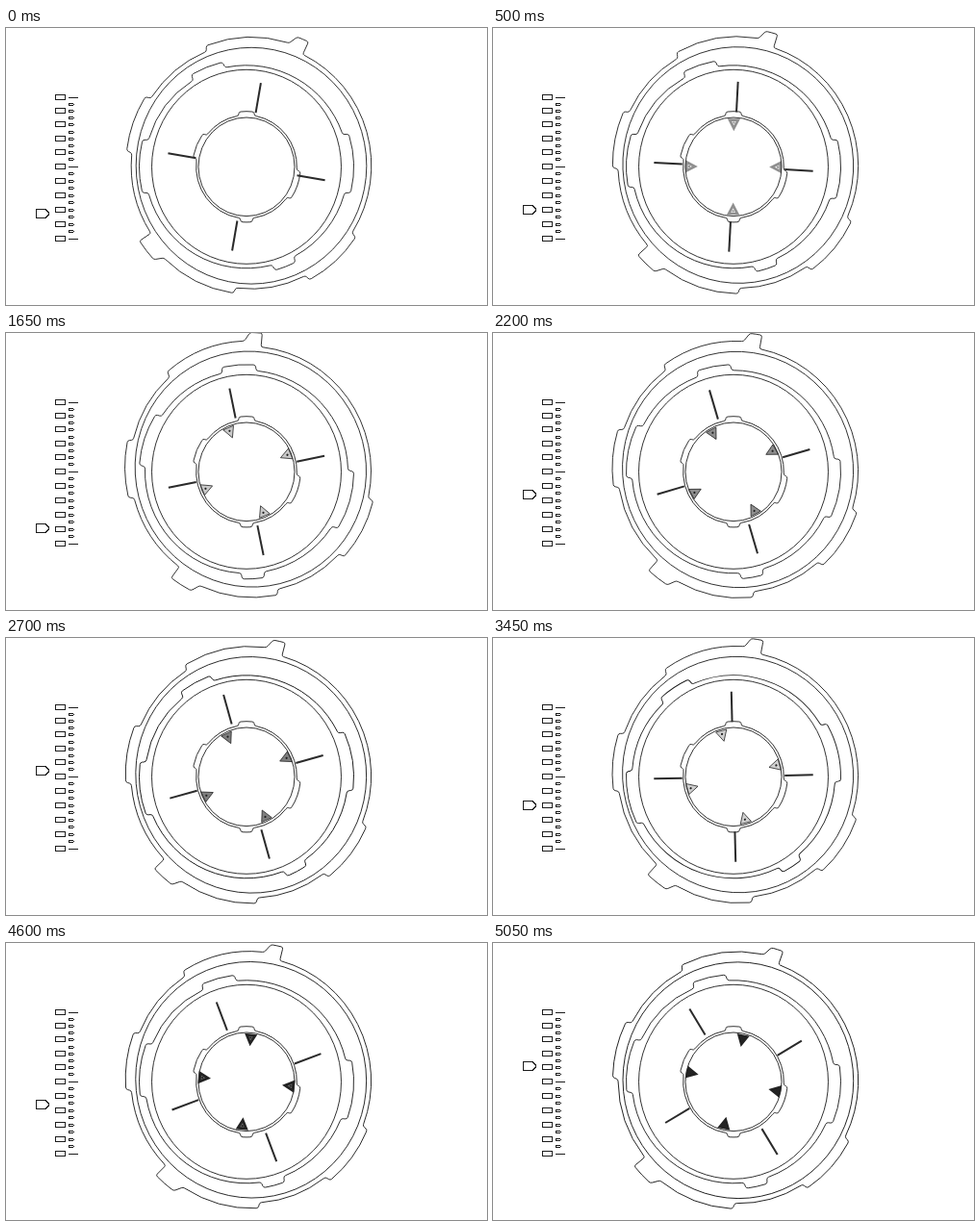
Animation of 500x288 px, one loop 5.1 s. Source, as an HTML page:

```html
<!DOCTYPE html>
<html lang="en">
<head>
<meta charset="utf-8">
<title>Dial</title>
<style>
html, body { margin: 0; width: 100%; height: 100%; overflow: hidden; background: #fff; }
svg { display: block; width: 500px; height: 288px; }
svg * { vector-effect: non-scaling-stroke; }
.line { fill: none; stroke: #1c1c1c; stroke-width: 0.9; stroke-linejoin: round; }
.crisp { stroke-width: 1; shape-rendering: crispEdges; }
.needle { stroke: #2a2a2a; stroke-width: 2; }
</style>
</head>
<body>
<svg id="stage" viewBox="0 0 500 288"></svg>
<script>
const LOOP = 5100, STEP = 50, SQUEEZE = 0.975;
const stage = document.getElementById('stage');

function add(parent, tag, attrs = {}) {
  const el = document.createElementNS('http://www.w3.org/2000/svg', tag);
  for (const key in attrs) el.setAttribute(key, attrs[key]);
  parent.appendChild(el);
  return el;
}

const group = (parent, transform) => add(parent, 'g', { transform });
const circle = (parent, r) => add(parent, 'circle', { class: 'line', r });

// Angles run clockwise from twelve o'clock.
function polar([angle, r]) {
  const a = angle * Math.PI / 180;
  return (r * Math.sin(a)).toFixed(2) + ' ' + (-r * Math.cos(a)).toFixed(2);
}

// A point a short way from one node towards another, for rounded corners.
function towards([a, r], [b, s]) {
  const da = (b - a + 900) % 360 - 180;
  const f = Math.min(0.4, 2 / Math.hypot(s - r, r * da * Math.PI / 180));
  return [a + da * f, r + (s - r) * f];
}

// Nodes of equal radius are joined by an arc, others by a line.
function ringPath(nodes) {
  const n = nodes.length;
  return nodes.map((node, i) => {
    const prev = nodes[(i + n - 1) % n], r = node[1];
    const join = i === 0 ? 'M' : prev[1] === r ? `A${r} ${r} 0 0 1 ` : 'L';
    const next = nodes[(i + 1) % n];
    return join + polar(towards(node, prev)) +
      'Q' + polar(node) + ' ' + polar(towards(node, next));
  }).join('') + `A${nodes[0][1]} ${nodes[0][1]} 0 0 1 ` +
    polar(towards(nodes[0], nodes[n - 1])) + 'Z';
}

// A ring with raised spans [from, to, horn]; a horn stands out at the end.
function raisedRing(parent, base, high, spans, slope = 0.9) {
  const top = high + 8.8;
  const nodes = spans.flatMap(([from, to, horn]) => [
    [from - slope, base], [from, high], [to, high],
    ...(horn ? [[to + 2.6, top], [to + horn, top], [to + horn, base]] : [[to + slope, base]])
  ]);
  add(parent, 'path', { class: 'line', d: ringPath(nodes) });
}

// Scale on the left: 20 ticks, a box at every second one
for (let i = 0; i <= 20; i++) {
  const y = Math.floor(i <= 10 ? 72 + 7.2 * i : 69 + 7.5 * i);
  if (i % 2 === 0) {
    add(stage, 'rect', { class: 'line crisp', x: 51.5, y: y - 2.5, width: 10, height: 5, rx: 1 });
  }
  if (i % 10 === 0) add(stage, 'path', { class: 'line crisp', d: `M65 ${y + 0.5}H75` });
  else add(stage, 'rect', { class: 'line crisp', x: 65.5, y: y - 0.5, width: 4.5, height: 2, rx: 0.8 });
}
const pointer = add(stage, 'path', {
  class: 'line crisp', d: 'M31.5 -4.5H41L44.5 -1V1L41 4.5H31.5Z'
});

// Every moving part turns about one pivot.
const pivot = group(stage, 'translate(250 144.3)');

const outer = add(pivot, 'g');
const rim = group(outer, `translate(5 -1.1) scale(${SQUEEZE} 1)`);
circle(rim, 122.9);
raisedRing(rim, 128, 133.7,
  [[123.8, 152.3], [188.2, 224.2, 12.5], [276.7, 302.3], [338.9, 377.5, 7.8]]);

const middle = add(pivot, 'g');
raisedRing(middle, 105.5, 111.5, [[72.3, 104], [153, 164.5], [256, 284.5], [329.2, 347]]);

const hub = group(pivot, `scale(${SQUEEZE} 1)`);
circle(hub, 101);
circle(hub, 51.3);
raisedRing(hub, 53.7, 57.6, [[95, 125], [174, 186], [280, 306.5], [352, 368]], 1.2);

const needles = add(pivot, 'g');
const cross = group(needles, 'scale(0.935 1)');
const markers = add(pivot, 'g');
const tips = [];
for (let a = 0; a < 360; a += 90) {
  add(cross, 'path', { class: 'needle', d: `M${polar([a, 57])}L${polar([a, 88.5])}` });
  const spot = group(markers, `rotate(${a}) translate(0 -46)`);
  tips.push(add(spot, 'path', { d: 'M-6 -3.6H6L0 8Z', stroke: '#222' }));
  add(spot, 'circle', { r: 1.1, fill: '#222' });
}

// Each part swings between turning points: time, value, time, value ...
const swings = {
  outer: [-300, 1.6, 1450, -20.4, 2850, -9.9, 3950, -17.1, 5300, -4.5],
  middle: [0, 0, 1800, 18, 3100, -13.7, 5000, 8.7],
  needles: [0, 9.7, 1250, -9.6, 2450, -17.2, 3800, 1.5, 5100, -31.2],
  markers: [700, 0.5, 2050, -28.2, 5900, 17],
  pointer: [0, 193.5, 700, 188.5, 1650, 203, 2700, 138, 4150, 208, 5050, 128],
  grey: [900, 255, 2600, 125, 4000, 250, 5050, 40]
};

const clamp = x => Math.min(1, Math.max(0, x));
const ease = x => (1 - Math.cos(Math.PI * clamp(x))) / 2;

function swing(name, t) {
  const p = swings[name];
  let value = p[1];
  for (let i = 2; i < p.length; i += 2) {
    value += (p[i + 1] - p[i - 1]) * ease((t - p[i - 2]) / (p[i] - p[i - 2]));
  }
  return value;
}

const rotors = { outer, middle, needles, markers };

function draw(t) {
  for (const name in rotors) {
    rotors[name].setAttribute('transform', `rotate(${swing(name, t).toFixed(3)})`);
  }
  pointer.setAttribute('transform', `translate(0 ${Math.round(swing('pointer', t) - 0.5)})`);

  // Markers turn bold as they near the axes.
  const weight = 0.8 + 1.9 * clamp((swing('markers', t) + 14) / 9);
  const grey = Math.round(swing('grey', t));
  markers.setAttribute('opacity', clamp((t - 400) / 200));
  tips.forEach(tip => {
    tip.setAttribute('stroke-width', weight);
    tip.setAttribute('fill', `rgb(${grey},${grey},${grey})`);
    tip.setAttribute('transform', `scale(${1.06 - 0.12 * weight})`);
  });
}

const start = performance.now();
function tick() {
  const t = (performance.now() - start) % LOOP;
  draw(Math.floor(t / STEP) * STEP);
  requestAnimationFrame(tick);
}
draw(0);
requestAnimationFrame(tick);
</script>
</body>
</html>
```
